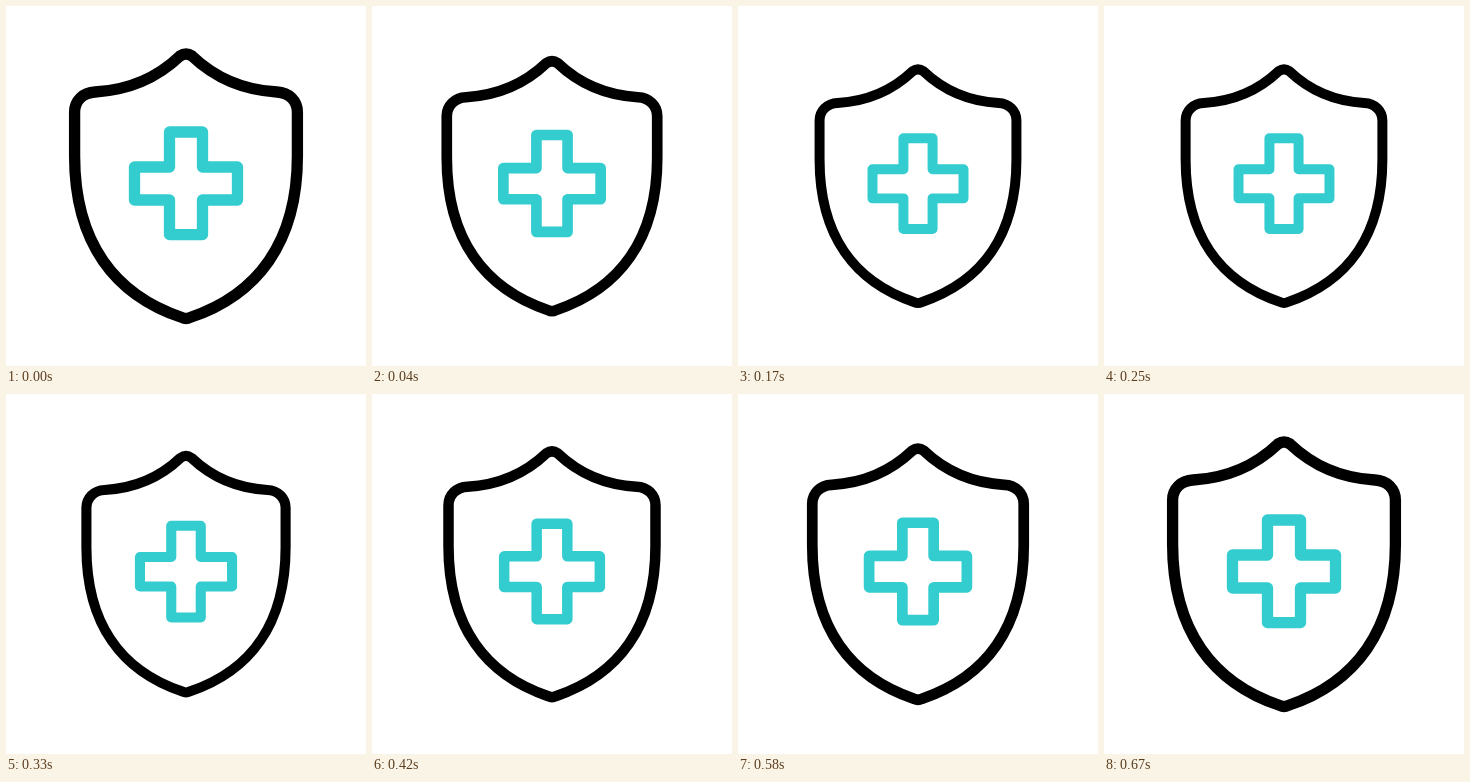
An HTML page with a canvas for the animation above (1540 ms loop, 360 by 360 pixels).

```html
<!DOCTYPE html>
<html lang="en">
<head>
<meta charset="utf-8">
<title>Shield pulse</title>
<style>
html, body { margin: 0; width: 100%; height: 100%; overflow: hidden; background: #fff; }
canvas { display: block; width: 100vw; height: 100vh; }
</style>
</head>
<body>
<canvas id="stage" width="360" height="360"></canvas>
<script>
const ctx = document.getElementById('stage').getContext('2d');
const LOOP = 1540;
const TICK = 1000 / 24;

const shield = new Path2D(
  'M68.6 106 V150 C68.6 237 109 289 176 311.5 Q180 313.5 184 311.5 ' +
  'C251 289 291.4 237 291.4 150 V106 C291.4 95 283 86.5 271 86 ' +
  'C235 84 208 71 186 50 Q180 45.8 174 50 ' +
  'C152 71 125 84 89 86 C77 86.5 68.6 95 68.6 106 Z');
const cross = new Path2D(
  'M163.5 126 H196.5 V161 H231.5 V194 H196.5 V228.6 H163.5 V194 H128.5 V161 H163.5 Z');

// Deep squeeze with a slow turn, then a short rebound.
function scaleAt(n) {
  if (n >= 16) return 1;
  if (n >= 12) return 0.949 + 0.051 * ((n - 14) / 2) ** 2;
  const turn = 4.9;
  const away = n < turn ? (turn - n) / turn : (n - turn) / (12 - turn);
  return 0.8825 + 0.1175 * away ** 2.8;
}

function outline(path, color, width) {
  ctx.strokeStyle = color;
  ctx.lineWidth = width;
  ctx.stroke(path);
}

function draw(ms) {
  const s = scaleAt(Math.floor((ms + 3.4) / TICK));
  ctx.setTransform(1, 0, 0, 1, 0, 0);
  ctx.fillStyle = '#fff';
  ctx.fillRect(0, 0, 360, 360);
  ctx.translate(180, 180);
  ctx.scale(s, s);
  ctx.translate(-180, -180);
  ctx.lineJoin = 'round';
  outline(shield, '#000', 11.3);
  outline(cross, '#33cccf', 11.3);
}

const start = performance.now();
function loop() {
  draw((performance.now() - start) % LOOP);
  requestAnimationFrame(loop);
}
loop();
</script>
</body>
</html>
```
